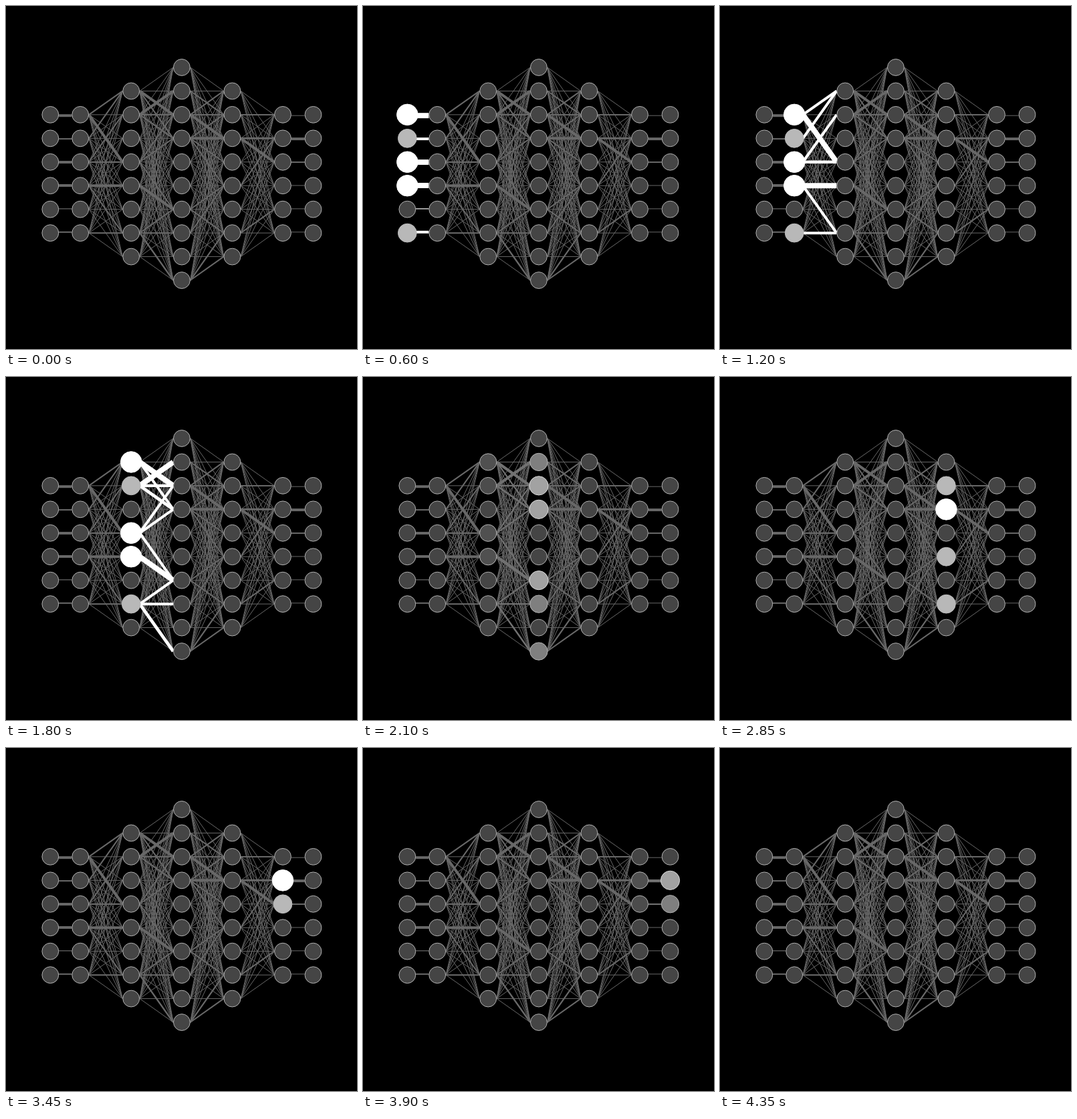
An HTML page with a canvas for the animation above (4.5 s loop, 525 by 514 pixels).

```html
<!DOCTYPE html>
<html lang="en">
<head>
<meta charset="utf-8">
<title>Neural network</title>
<style>
  html, body { margin: 0; width: 100%; height: 100%; overflow: hidden; background: #000; }
  canvas { display: block; }
</style>
</head>
<body>
<canvas id="stage" width="525" height="514"></canvas>
<script>
const ctx = document.getElementById("stage").getContext("2d");
const STEP = 150, STEPS = 30;
const MID_Y = 251.5, ROW = 35.45, RADIUS = 12.4;
const GREY = 0.62;

// One string per layer: W fully active, g partly active, - idle.
const layers = [
  [66.3, "WgWW-g"],
  [111.2, "WgWW-g"],
  [187.2, "Wg-WW-g-"],
  [262.9, "-gWW--Wg-g"],
  [338.4, "-gW-g-g-"],
  [414, "-Wg---"],
  [459.5, "-Wg---"]
].map(([x, pattern]) => ({
  x,
  nodes: [...pattern].map((c, i) => ({
    y: MID_Y + (i - (pattern.length - 1) / 2) * ROW,
    level: c === "W" ? 1 : c === "g" ? GREY : 0
  }))
}));

// Strong links as "from to width"; a trailing ! marks links that never light up.
const strong = [
  "0 0 4,1 1 2,2 2 4,3 3 4,4 4 .5,5 5 2",
  "0 0 2,0 3 4,1 0 2,2 1 2,2 3 2.2,3 4 4,3 6 2,5 6 2",
  "0 2 4,0 3 2,1 1 4,1 2 2.2,1 3 2.4,3 2 2,3 3 2,3 6 2,4 6 4,6 6 2,6 7 2,6 9 2.4",
  "1 1 2,2 0 2,2 1 2,2 2 4,3 1 2!,3 2 4,3 3 2,3 4 2,6 4 2,6 6 2,7 4 2,9 6 2.2,9 7 2",
  "1 0 2,2 1 3,2 2 4,4 1 2,6 4 2",
  "1 1 4,2 2 2"
].map(list => list.split(",").map(item => {
  const [from, to, width] = item.replace("!", "").split(" ").map(Number);
  return { from, to, width, lights: !item.endsWith("!") };
}));

// Pulse values for successive steps of one layer.
const nodePulse = [0.06, 0.5, 1, 1, 0.5, 0.06];
const lastPulse = [0.06, 0.5, 1, 0.06];
const linkPulse = [0, 0, 0, 1, 0.5, 0.06];

const isShort = k => k === 0 || k === layers.length - 2;
const mix = (a, b, v) => a + (b - a) * v;
const grey = v => `rgb(${v},${v},${v})`;

function link(k, from, to, width, color) {
  const a = layers[k], b = layers[k + 1];
  const squeeze = isShort(k) ? 0.985 : 1;
  const edgeY = node => MID_Y + (node.y - MID_Y) * squeeze;
  ctx.beginPath();
  ctx.moveTo(a.x + 12.8, edgeY(a.nodes[from]));
  ctx.lineTo(b.x - 12.8, edgeY(b.nodes[to]));
  ctx.lineWidth = width;
  ctx.strokeStyle = color;
  ctx.stroke();
}

function drawLinks(k, lit) {
  const a = layers[k].nodes, b = layers[k + 1].nodes;
  a.forEach((_, i) => b.forEach((_, j) => {
    if (!isShort(k) || i === j) link(k, i, j, 1, grey(104));
  }));
  for (const s of strong[k]) {
    const v = s.lights ? lit : 0;
    link(k, s.from, s.to, s.width * (1 + v), grey(mix(104, 255, v)));
  }
}

function drawNode(x, y, level, pulse) {
  const v = level * pulse;
  const full = level === 1 ? 255 : 184;
  const grow = level === 1 ? 3.4 : 1.5;
  ctx.beginPath();
  ctx.arc(x, y, RADIUS + (level ? grow * pulse : 0), 0, 2 * Math.PI);
  ctx.fillStyle = grey(v ? mix(69, full, pulse) : 69);
  ctx.fill();
  ctx.lineWidth = 1;
  ctx.strokeStyle = grey(v ? mix(178, full, pulse) : 178);
  ctx.stroke();
}

function draw(step) {
  ctx.fillStyle = "#000";
  ctx.fillRect(0, 0, 525, 514);
  const local = k => step - 1 - 4 * k;
  for (let k = 0; k < layers.length - 1; k++) drawLinks(k, linkPulse[local(k)] || 0);
  layers.forEach(({ x, nodes }, k) => {
    const pulse = (k === layers.length - 1 ? lastPulse : nodePulse)[local(k)] || 0;
    nodes.forEach(n => drawNode(x, n.y, n.level, pulse));
  });
}

function tick() {
  draw(Math.floor(performance.now() / STEP) % STEPS);
  requestAnimationFrame(tick);
}
tick();
</script>
</body>
</html>
```
